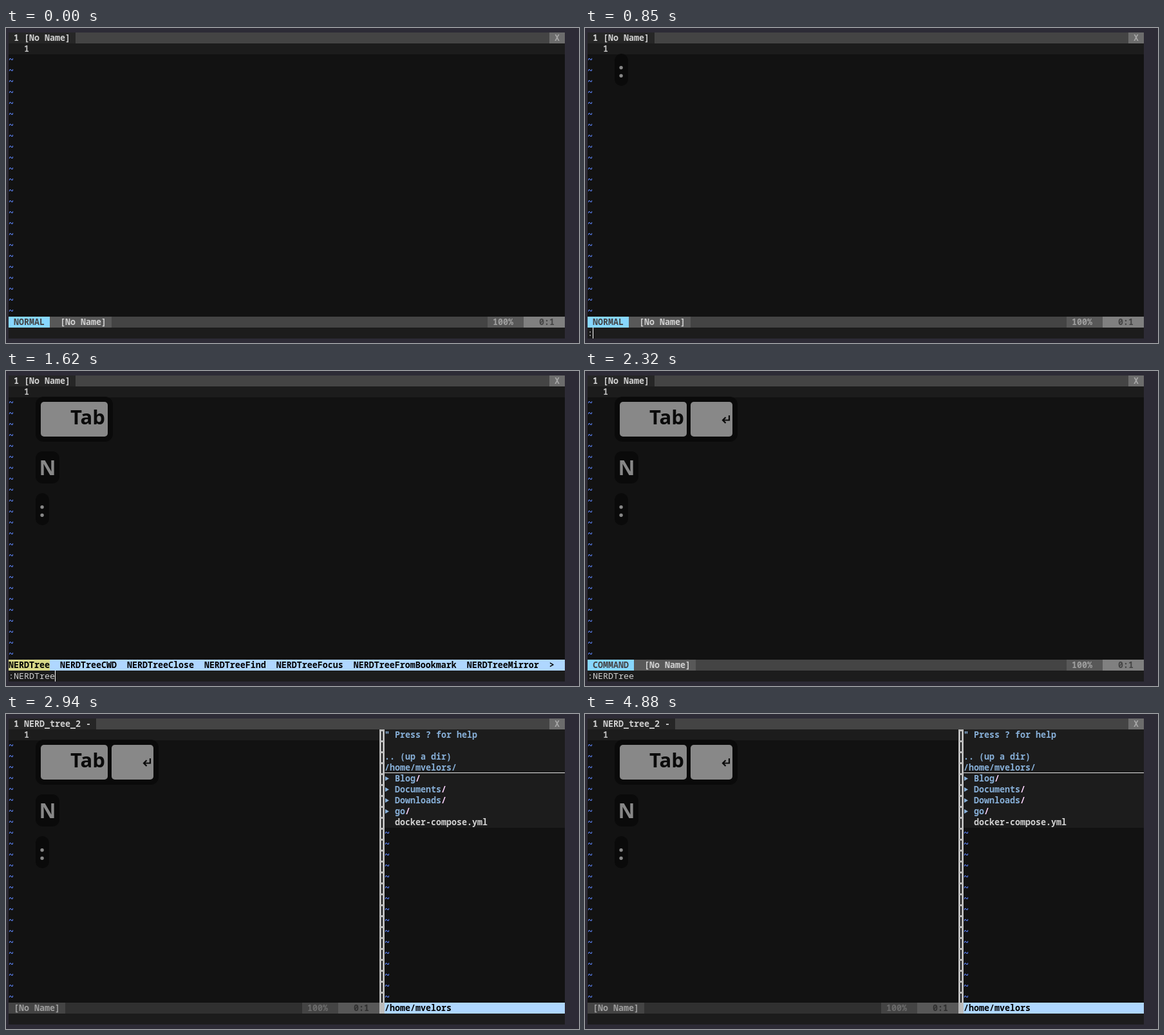
These frames come from a looping animation (890 px wide and 490 px high, 4960 ms). An HTML page:

```html
<!DOCTYPE html>
<html lang="en">
<head>
<meta charset="utf-8">
<title>Editor file tree</title>
<style>
html, body { margin: 0; width: 100%; height: 100%; overflow: hidden; background: #2d2b36; }
svg { display: block; width: 890px; height: 490px; }
text { white-space: pre; }
.mono { font: 600 13.3333px "Noto Sans Mono", "DejaVu Sans Mono", monospace; }
.key { font: 700 32px "Noto Sans", "Open Sans", sans-serif; }
</style>
</head>
<body>
<svg id="stage" viewBox="0 0 890 490"></svg>
<script>
const LOOP = 4960;
const CELL = 8, LINE = 17, LEFT = 4, TOP = 7;
const COLS = 108, SPLIT = 72, BODY_END = 25, STATUS = 26, COMMAND = 27;
const INK = '#0a0a0a', KEY = '#888888', BLUE = '#87afd7', PALE = '#afd7ff', LIGHT = '#d0d0d0';
const USER = 'mvelors';

const stage = document.getElementById('stage');
const colX = c => LEFT + c * CELL;
const rowY = r => TOP + r * LINE;

const rect = (x, y, w, h, fill, r = 0) =>
  `<rect x="${x}" y="${y}" width="${w}" height="${h}" rx="${r}" fill="${fill}"/>`;
const cells = (c, r, w, fill, h = 1) => rect(colX(c), rowY(r), w * CELL, h * LINE, fill);
const text = (c, r, str, fill, weight = 600) =>
  `<text class="mono" x="${colX(c)}" y="${rowY(r) + 13}" fill="${fill}" style="font-weight:${weight}">${str}</text>`;
// A filled run of cells with its padded label
const label = (c, r, str, fill, bg) => cells(c, r, str.length, bg) + text(c, r, str, fill);
const cursor = (c, r, h = LINE) => rect(colX(c), rowY(r), 1, h, '#ffffff');

function tildes(c, from) {
  let out = '';
  for (let r = from; r <= BODY_END; r++) out += text(c, r, '~', '#5f87ff');
  return out;
}

function base(title) {
  return rect(0, 0, 890, 490, '#2d2b36') +
    cells(0, 0, COLS, '#121212', 28) +
    cells(0, 0, COLS, '#444444') +
    label(0, 0, ` 1 ${title} `, LIGHT, '#262626') +
    label(105, 0, ' X ', '#a8a8a8', '#6c6c6c') +
    cells(0, 1, COLS, '#1c1c1c') +
    text(3, 1, '1', '#bcbcbc') +
    tildes(0, 2) +
    cells(0, COMMAND, COLS, '#1c1c1c');
}

function statusBar(mode) {
  const name = ` ${mode} `;
  return cells(0, STATUS, COLS, '#444444') +
    label(0, STATUS, name, '#444444', '#87d7ff') +
    label(name.length, STATUS, '  [No Name] ', LIGHT, '#585858') +
    label(93, STATUS, ' 100%  ', '#9e9e9e', '#585858') +
    label(100, STATUS, '   0:1  ', '#444444', '#808080');
}

function wildMenu() {
  const names = ['', 'CWD', 'Close', 'Find', 'Focus', 'FromBookmark', 'Mirror'];
  const line = names.map(n => 'NERDTree' + n).join('  ') + '  &gt;';
  return cells(0, STATUS, COLS, PALE) + cells(0, STATUS, 8, '#d7d787') +
    text(0, STATUS, line, '#000000');
}

function treePane() {
  const c = SPLIT + 1, w = COLS - c;
  let out = cells(SPLIT, 1, 1, '#bcbcbc', 26);
  for (let r = 1; r <= BODY_END; r++) out += rect(colX(SPLIT) + 3, rowY(r) + 3, 2, 14, '#121212');
  out += cells(c, 1, w, '#1c1c1c', 9) +
    text(c, 1, '" Press ? for help', BLUE) +
    text(c, 3, '.. (up a dir)', BLUE) +
    text(c, 4, `/home/${USER}/`, BLUE) +
    rect(colX(c), rowY(5) - 1, w * CELL, 1, '#e4e4e4');
  ['Blog', 'Documents', 'Downloads', 'go'].forEach((dir, i) => {
    const y = rowY(5 + i) + 8.5, x = colX(c);
    out += `<path d="M${x + 1} ${y - 3.5}l6 3.5l-6 3.5z" fill="${BLUE}"/>` +
      text(c + 2, 5 + i, dir, BLUE) +
      text(c + 2 + dir.length, 5 + i, '/', '#ffd7ff');
  });
  return out + text(c + 2, 9, 'docker-compose.yml', LIGHT) + tildes(c, 10) +
    cells(0, STATUS, SPLIT, '#303030') +
    label(0, STATUS, ' [No Name] ', '#9e9e9e', '#444444') +
    label(57, STATUS, ' 100%  ', '#6c6c6c', '#444444') +
    label(64, STATUS, '   0:1  ', '#303030', '#585858') +
    cells(c, STATUS, w, PALE) +
    text(c, STATUS, `/home/${USER}`, '#000000');
}

const glyph = (x, y, str, fill, size = 32) =>
  `<text class="key" x="${x}" y="${y}" fill="${fill}" style="font-size:${size}px">${str}</text>`;

// Pressed keys, newest on top
function keys(count) {
  let y = 40, out = '';
  if (count > 2) {
    const enter = count > 3;
    out += rect(46, y, enter ? 191 : 120, 70, INK, 12) +
      rect(54, 48, 104, 54, KEY, 5) + glyph(100, 83, 'Tab', INK, 31);
    if (enter) {
      out += rect(164, 48, 65, 54, KEY, 5) +
        `<path d="M224 69V76.5H214M218.5 72L214 76.5L218.5 81" fill="none" stroke="${INK}" stroke-width="2.2"/>`;
    }
    y += 85;
  }
  if (count > 1) {
    out += rect(46, y, 37, 50, INK, 11) + glyph(51.5, y + 36.6, 'N', KEY);
    y += 65;
  }
  if (count > 0) out += rect(46, y, 21, 50, INK, 10.5) + glyph(51.6, y + 37, ':', KEY);
  return out;
}

function editor({ mode = 'NORMAL', menu = false, typed = '', pressed = 0, caret = '' }) {
  return base('[No Name]') + (menu ? wildMenu() : statusBar(mode)) +
    text(0, COMMAND, typed, LIGHT, 500) + caret + keys(pressed);
}

const tree = shown => base('NERD_tree_2 -') + treePane() +
  (shown ? cursor(SPLIT + 1, 4, 16) : '') + keys(4);

const prompt = (typed, pressed, more = {}) =>
  editor({ typed, pressed, caret: cursor(typed.length, COMMAND), ...more });

const scenes = [
  [0, () => editor({})],
  [530, () => editor({ caret: cursor(5, 1) })],
  [770, () => prompt(':', 1, { mode: 'COMMAND' })],
  [850, () => prompt(':', 1)],
  [1160, () => prompt(':N', 2, { mode: 'COMMAND' })],
  [1240, () => prompt(':N', 2)],
  [1620, () => prompt(':NERDTree', 3, { menu: true })],
  [2320, () => editor({ mode: 'COMMAND', typed: ':NERDTree', pressed: 4 })],
  [2400, () => tree(false)],
  [2470, () => tree(true)],
  [2940, () => tree(false)],
  [3490, () => tree(true)],
  [4020, () => tree(false)],
  [4650, () => tree(true)],
  [4880, () => tree(false)]
];

let current = -1;
function draw(ms) {
  const t = ms % LOOP;
  const index = scenes.filter(([start]) => start <= t).length - 1;
  if (index === current) return;
  current = index;
  stage.innerHTML = scenes[index][1]();
}

const begin = performance.now();
function tick() {
  draw(performance.now() - begin);
  requestAnimationFrame(tick);
}
tick();
</script>
</body>
</html>
```
